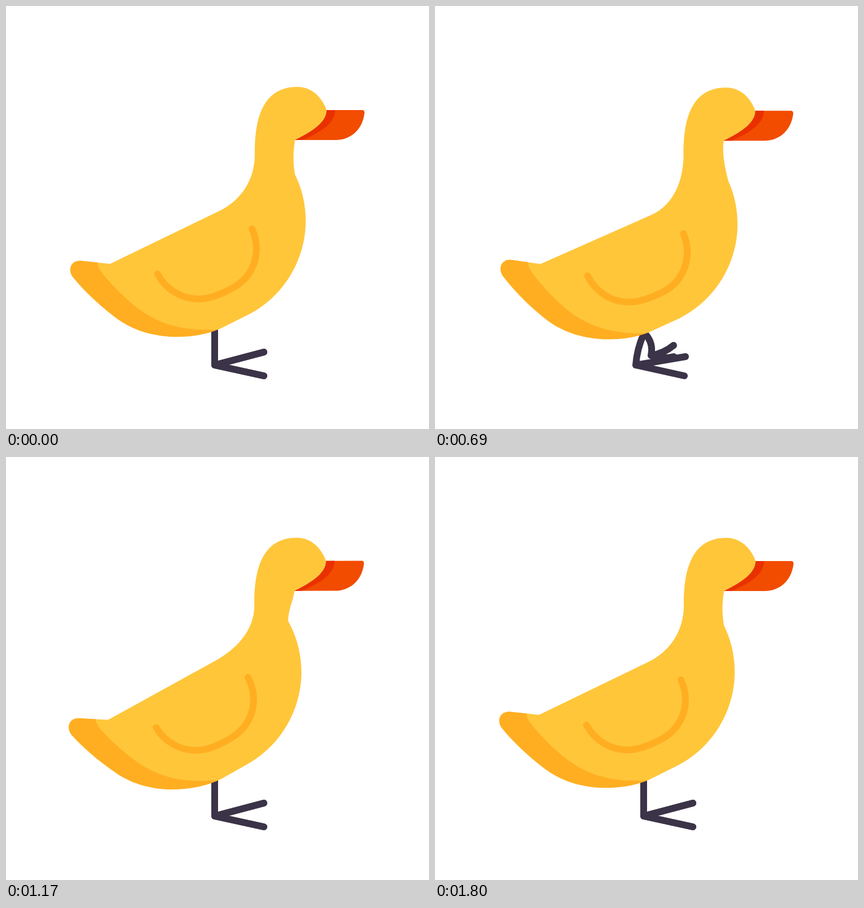
Recreate the animation shown at these times as an HTML page with a canvas. Size 748x748 px, loop 1830 ms.

```html
<!DOCTYPE html>
<html>
<head>
<meta charset="utf-8">
<style>
html, body { margin: 0; width: 100%; height: 100%; overflow: hidden; background: #fff; }
canvas { display: block; }
</style>
</head>
<body>
<canvas id="stage" width="748" height="748"></canvas>
<script>
const ctx = document.getElementById('stage').getContext('2d');
const LOOP = 1830, STEP = 30;
const YELLOW = '#ffc63a', AMBER = '#ffae22', ORANGE = '#f24c00', RED = '#e93100', DARK = '#3b3347';

// time, rotation in degrees, drop
const bodyKeys = [
  [0, 0, 0], [270, 9.5, -1.5], [450, 3.74, 7.5], [570, 0, 6], [690, 1.95, 6],
  [855, 7, 5], [990, 5.1, 4.5], [1190, -3.2, 0], [1380, 0.1, 0.3], [1500, 0, 0], [LOOP, 0, 0]
];
// time, dx, dy, rotation in degrees
const headKeys = [
  [0, 0, 0, 0], [270, -1, 0, 0], [360, -1, -2, 0], [450, -0.5, -1, 0], [690, -0.5, 1.3, 0],
  [990, -9.2, -3.2, -1.7], [1060, -11, -5.5, -2], [1390, 27.8, 14.7, 5.1],
  [1660, -2.5, -2.5, -0.4], [1800, 0, 0, 0], [LOOP, 0, 0, 0]
];
// time, hip, heel, upper toe, lower toe, leg bend, toe bend
const rest = [369, 573, 369, 635, 456, 612, 456, 654, 0, 0];
const nearLeg = [
  [0, ...rest],
  [270, 371, 575, 374, 635, 456, 608, 456, 650, 0, 0],
  [450, 388, 572, 411, 631, 456, 576, 456, 600, -6, 18],
  [690, 372, 580, 382, 618, 422, 600, 422, 620, -10, 6],
  [990, 363, 580, 356, 620, 396, 616, 396, 634, 2, 0],
  [1170, ...rest], [LOOP, ...rest]
];
const farLeg = [
  [0, ...rest],
  [270, 347, 579, 333, 609, 377, 654, 377, 654, -3, -16],
  [450, 363, 582, 344, 629, 412, 626, 420, 654, 2, -4],
  [690, 369, 580, 355, 635, 443, 620, 441, 654, 5, 0],
  [990, ...rest], [LOOP, ...rest]
];

// Smooth interpolation that never overshoots a key
function sample(keys, t) {
  let i = 0;
  while (i < keys.length - 2 && t >= keys[i + 1][0]) i++;
  const a = keys[i], b = keys[i + 1], span = b[0] - a[0], u = (t - a[0]) / span;
  const slope = (k, c) => (keys[k + 1][c] - keys[k][c]) / (keys[k + 1][0] - keys[k][0]);
  const tangent = (k, c) => {
    if (k < 1 || k > keys.length - 2) return 0;
    const p = slope(k - 1, c), q = slope(k, c);
    return p * q > 0 ? 2 * p * q / (p + q) : 0;
  };
  return a.slice(1).map((v, n) => {
    const c = n + 1, d = b[c] - v;
    const m0 = tangent(i, c) * span, m1 = tangent(i + 1, c) * span;
    return v + u * (m0 + u * (3 * d - 2 * m0 - m1 + u * (m0 + m1 - 2 * d)));
  });
}

const pose = (px, py, dx, dy, deg) =>
  new DOMMatrix().translate(px + dx, py + dy).rotate(deg).translate(-px, -py);

const mapper = m => (x, y) => [m.a * x + m.c * y + m.e, m.b * x + m.d * y + m.f];

function limb(x0, y0, x1, y1, bend) {
  const dx = x1 - x0, dy = y1 - y0, k = bend / (Math.hypot(dx, dy) || 1);
  ctx.moveTo(x0, y0);
  ctx.quadraticCurveTo((x0 + x1) / 2 - dy * k, (y0 + y1) / 2 + dx * k, x1, y1);
}

function drawLeg(keys, t) {
  const [hx, hy, fx, fy, ux, uy, lx, ly, legBend, toeBend] = sample(keys, t);
  ctx.beginPath();
  limb(hx, hy, fx, fy, legBend);
  limb(fx, fy, ux, uy, toeBend);
  limb(fx, fy, lx, ly, toeBend);
  ctx.strokeStyle = DARK;
  ctx.stroke();
}

function fill(path, color) {
  ctx.fillStyle = color;
  ctx.fill(new Path2D(path));
}

const rump = 'C350 582 325 585 300 585 C250 584 215 568 190 548 C160 525 135 500 118 479 C108 464 117 449 132 450.5';
const shade = 'M162 453.5 C162 462 168 470 174 477 C196 503 224 530 250 546 C285 567 325 575 375 572 ' + rump + 'Z';
const wing = new Path2D('M268 474 C283 502 311 518 340 518 C362 518 384 508 402 498 C441 476 452 432 435 394');
const beak = 'M567 184 H630 Q634 184 634 189 C630 222 606 237 583 237 H511 C535 225 567 208 567 184Z';
const beakShade = 'M567 184 H582 C582 206 560 222 524 237 H511 C535 225 567 208 567 184Z';

function drawOutline(b, h, lean) {
  const line = p => ctx.lineTo(...p);
  const curve = (p, q, r) => ctx.bezierCurveTo(...p, ...q, ...r);
  const throat = h(511, 237), chest = b(511 + 21 * lean, 298 + 14 * lean);
  const side = 14 * lean;
  ctx.beginPath();
  ctx.moveTo(...h(440, 262));
  curve(h(440, 215), h(446, 143), h(515, 143));
  curve(h(540, 143), h(558, 160), h(567, 184));
  curve(h(567, 208), h(535, 225), throat);
  curve(h(508, 257),
    [chest[0] + 0.4 * (throat[0] - chest[0]) - 4, chest[1] + 0.4 * (throat[1] - chest[1])], chest);
  curve(b(523 + 17 * lean, 322 + 10 * lean), b(530 + side, 350), b(530 + side, 380));
  curve(b(530 + side, 448), b(492 + side / 3, 512), b(432, 544));
  line(b(378, 571));
  curve(b(350, 582), b(325, 585), b(300, 585));
  curve(b(250, 584), b(215, 568), b(190, 548));
  curve(b(160, 525), b(135, 500), b(118, 479));
  curve(b(108, 464), b(117, 449), b(132, 450.5));
  line(b(184, 456));
  line(b(378, 362));
  curve(b(415, 344), h(440, 308), h(440, 262));
  ctx.fillStyle = YELLOW;
  ctx.fill();
}

function draw(t) {
  const [tilt, drop] = sample(bodyKeys, t);
  const [dx, dy, nod] = sample(headKeys, t);
  const body = pose(351.5, 434, 1.6 * tilt, drop, tilt);
  const head = pose(540, 210, dx, dy, nod);

  ctx.resetTransform();
  ctx.clearRect(0, 0, 748, 748);
  ctx.lineWidth = 12;
  ctx.lineCap = ctx.lineJoin = 'round';
  drawLeg(farLeg, t);
  drawLeg(nearLeg, t);
  drawOutline(mapper(body), mapper(head), Math.max(0, dx / 27.6));

  ctx.setTransform(body);
  fill(shade, AMBER);
  ctx.strokeStyle = AMBER;
  ctx.stroke(wing);

  ctx.setTransform(head);
  fill(beak, ORANGE);
  fill(beakShade, RED);
}

const start = performance.now();
function tick() {
  const t = (performance.now() - start) % LOOP;
  draw(Math.floor(t / STEP) * STEP);
  requestAnimationFrame(tick);
}
tick();
</script>
</body>
</html>
```
